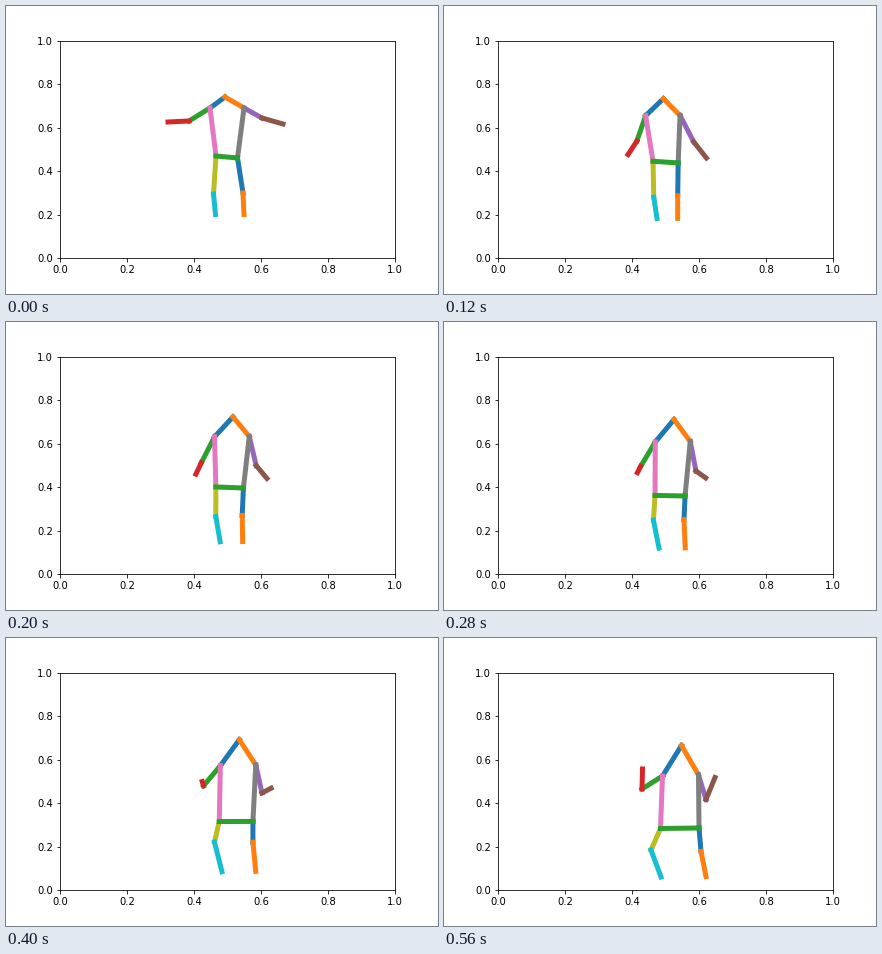
Recreate the animation shown at these times as a matplotlib script. Size 432 by 288 pixels, loop 600 ms.

```python
import numpy as np
import matplotlib.pyplot as plt
from matplotlib.animation import FuncAnimation

W, H, DPI = 432, 288, 72
FRAMES, INTERVAL = 15, 40
LEFT, RIGHT, BOTTOM, TOP = 0.125, 0.9, 0.125, 0.88

plt.rcParams.update({"font.family": "DejaVu Sans", "font.size": 10})

# First and last pose in stage pixels, y downwards.
POSES = {
    "neck": ((219, 91), (237.5, 107.5)),
    "l_shoulder": ((204, 102), (218.5, 138)),
    "r_shoulder": ((238, 102), (254.5, 137)),
    "l_elbow": ((183, 115), (198, 151)),
    "r_elbow": ((256, 112), (262, 161.5)),
    "l_wrist": ((162, 116), (198.5, 131)),
    "r_wrist": ((277, 118), (271, 139.5)),
    "l_hip": ((210, 150), (216.5, 190.5)),
    "r_hip": ((231.5, 152), (255, 190)),
    "l_knee": ((207.5, 188), (207, 212)),
    "r_knee": ((237, 187), (257, 213.5)),
    "l_ankle": ((209.5, 208.5), (217, 239)),
    "r_ankle": ((238, 208.5), (262, 238.5)),
}

# How far a joint swings away from the straight path between its poses.
BOW = {
    "neck": (2, -2),
    "l_elbow": (7, 13), "r_elbow": (-8, 14),
    "l_wrist": (15, 31), "r_wrist": (-14, 31),
    "l_hip": (-2.5, 0), "r_hip": (-2.5, 0),
    "l_knee": (2.5, -2), "r_knee": (-8, -3),
    "l_ankle": (2, 0), "r_ankle": (-10, 0),
}

SINKING = {"l_hip", "r_hip", "l_ankle", "r_ankle"}
LURCHING = {"neck", "l_shoulder", "r_shoulder"}

# Drawn in this order, coloured by the default cycle.
BONES = [
    ("neck", "l_shoulder"), ("neck", "r_shoulder"),
    ("l_shoulder", "l_elbow"), ("l_elbow", "l_wrist"),
    ("r_shoulder", "r_elbow"), ("r_elbow", "r_wrist"),
    ("l_shoulder", "l_hip"), ("r_shoulder", "r_hip"),
    ("l_hip", "l_knee"), ("l_knee", "l_ankle"),
    ("r_hip", "r_knee"), ("r_knee", "r_ankle"),
    ("l_hip", "r_hip"),
]


def swing(t):
    """Quick rise and slow return, zero at both ends."""
    return np.sin(np.pi * t ** 0.6)


def sink(t):
    """Ease-out that starts after a short delay."""
    s = np.clip((t - 1 / 7) * 7 / 6, 0, 1)
    return 1 - (1 - s) ** 1.6


def lurch(t):
    """Brief sideways dip of the upper body."""
    return -5.5 * np.exp(-((t - 0.21) / 0.1) ** 2)


def joint_at(name, t):
    """Joint position in axes data units."""
    (x0, y0), (x1, y1) = POSES[name]
    dx, dy = BOW.get(name, (0, 0))
    fall = sink(t) if name in SINKING else t
    x = x0 + (x1 - x0) * t + dx * swing(t)
    y = y0 + (y1 - y0) * fall + dy * swing(t)
    if name in LURCHING and t > 0:
        x += lurch(t)
    return ((x / W - LEFT) / (RIGHT - LEFT),
            (1 - y / H - BOTTOM) / (TOP - BOTTOM))


fig, ax = plt.subplots(figsize=(W / DPI, H / DPI), dpi=DPI)
fig.subplots_adjust(left=LEFT, right=RIGHT, bottom=BOTTOM, top=TOP)
ax.set_xlim(0, 1)
ax.set_ylim(0, 1)
lines = [ax.plot([], [], lw=5)[0] for _ in BONES]


def draw(frame):
    t = frame / (FRAMES - 1)
    for line, bone in zip(lines, BONES):
        line.set_data(*zip(*(joint_at(name, t) for name in bone)))
    return lines


anim = FuncAnimation(fig, draw, frames=FRAMES, interval=INTERVAL,
                     init_func=lambda: draw(0), repeat=True, repeat_delay=0)
plt.show()
```
